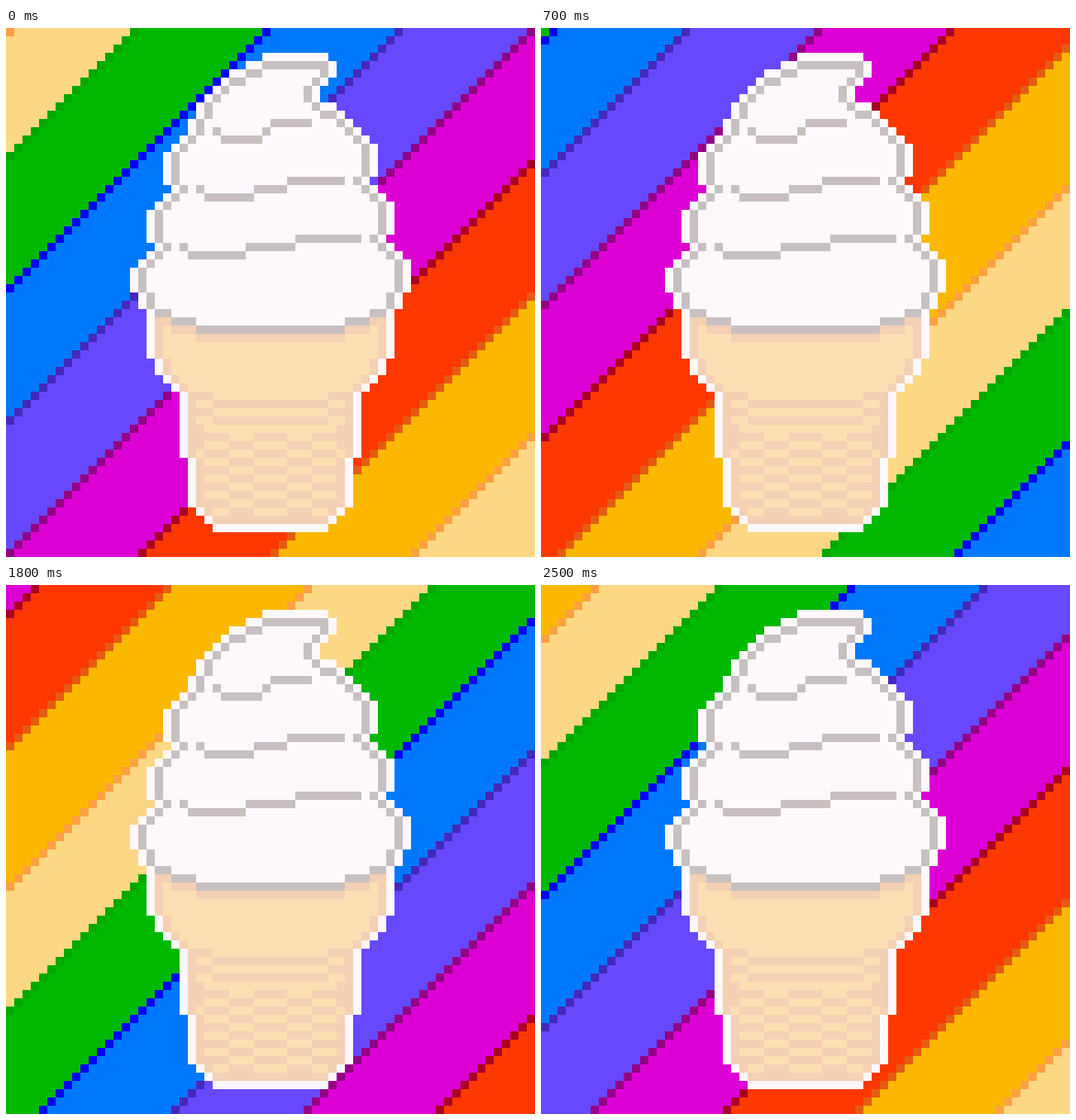
An HTML page with a canvas for the animation above (2600 ms loop, 640x640 px).

```html
<!DOCTYPE html>
<html lang="en">
<head>
<meta charset="utf-8">
<title>Soft serve</title>
<style>
html, body { margin: 0; width: 100%; height: 100%; overflow: hidden; }
canvas { display: block; width: 640px; height: 640px; image-rendering: pixelated; }
</style>
</head>
<body>
<canvas id="stage" width="64" height="64"></canvas>
<script>
const SIZE = 64, BAND = 16, STEPS = 26, STEP_MS = 100;
const ctx = document.getElementById('stage').getContext('2d');
const WHITE = '#fcf8fc', GRAY = '#c8c0c0', WAFER = '#fcdfb2', SHADE = '#f4d0b4';

// edge and body colour of each diagonal band
const bands = [
  ['#fca044', '#fcd884'], ['#00a800', '#00b800'], ['#0000fc', '#0078fc'],
  ['#4428bc', '#6848fc'], ['#940084', '#dc00d4'], ['#a80020', '#fc3800'],
  ['#e45c10', '#fcb800']
];
const PERIOD = BAND * bands.length;

// cells along straight and diagonal segments between key points
function trace(...points) {
  let [[x, y]] = points;
  const cells = [[x, y]];
  for (const [px, py] of points) {
    while (x !== px || y !== py) {
      x += Math.sign(px - x);
      y += Math.sign(py - y);
      cells.push([x, y]);
    }
  }
  return cells;
}
const mirror = (cells, drop = 0) => cells.map(([x, y]) => [SIZE - 1 - x, y + drop]);

function rowSpans(cells) {
  const rows = {};
  for (const [x, y] of cells) {
    const r = rows[y] || (rows[y] = [x, x]);
    r[0] = Math.min(r[0], x);
    r[1] = Math.max(r[1], x);
  }
  return Object.entries(rows).map(([y, [a, b]]) => [a, +y, b - a + 1]);
}

const tip = trace([20, 15], [23, 12], [23, 11], [24, 10], [24, 9], [27, 6], [28, 6], [29, 5],
  [30, 5], [31, 4], [38, 4], [38, 5], [36, 7], [36, 8], [38, 10], [39, 10], [43, 14]);
const lobes = trace([43, 14], [43, 17], [42, 18], [45, 21], [45, 24], [44, 25], [47, 28], [47, 30]);
const base = trace([47, 31], [46, 32], [46, 33], [45, 34], [44, 34], [43, 35], [41, 35], [40, 36], [32, 36]);
const side = trace([45, 35], [45, 39], [44, 40], [44, 41], [41, 44], [41, 51], [40, 52], [40, 57], [38, 59], [32, 59]);

// the left lobes hang one cell lower than the right ones
const cream = [...tip, ...lobes, ...mirror(lobes, 1), ...base, ...mirror(base)];
const cone = [...side, ...mirror(side)];
const shadow = cream.filter(c => c[1] >= 34).map(([x, y]) => [x, y + 1]);
const creamRows = rowSpans(cream), coneRows = rowSpans(cone);

function rect(color, x, y, w = 1, h = 1) {
  ctx.fillStyle = color;
  ctx.fillRect(x, y, w, h);
}
const dots = (cells, color) => cells.forEach(([x, y]) => rect(color, x, y));
const fill = (rows, color) => rows.forEach(([x, y, w]) => rect(color, x, y, w));

function drawBands(shift) {
  for (let d = 0; d < 2 * SIZE - 1; d++) {
    const p = (d + shift) % PERIOD;
    const i = Math.min(bands.length - 1, Math.floor((p + 1) / BAND));
    const [edge, body] = bands[i];
    const color = p === Math.max(0, i * BAND - 1) ? edge : body;
    for (let x = 0; x <= d; x++) rect(color, x, d - x);
  }
}

function drawWaffle() {
  for (let y = 44; y <= 50; y += 2) {
    const w = y < 48 ? 2 : 1;
    rect(SHADE, 23, y, w);
    rect(SHADE, 41 - w, y, w);
  }
  rect(SHADE, 25, 45, 14);
  rect(SHADE, 25, 47, 14);
  for (let y = 49; y < 59; y++) {
    const left = Math.min(24, y - 26);
    for (let x = left; x < SIZE - left; x++) {
      const wide = (x - 23) % 7 < 4;
      if (wide === (y % 2 === 1)) rect(SHADE, x, y);
    }
  }
}

// each fold is a dot, then three runs that climb one cell at a time
function drawFolds() {
  [[5, 1, 5], [6, 4, 7], [7, 6, 8]].forEach((runs, i) => {
    let x = 25 - 2 * i, y = 12 + 7 * i;
    rect(GRAY, x++, y++);
    for (const w of runs) {
      rect(GRAY, x, y--, w);
      x += w;
    }
  });
}

function drawIceCream() {
  for (const [x, y, w] of [...creamRows, ...coneRows]) {
    rect(WHITE, x - 1, y, w + 2);
    rect(WHITE, x, y - 1, w, 3);
  }
  fill(coneRows, WAFER);
  dots(cone, SHADE);
  drawWaffle();
  dots(shadow, SHADE);
  fill(creamRows, WHITE);
  dots(cream, GRAY);
  drawFolds();
}

const begin = performance.now();
let shown = -1;
function frame() {
  const step = Math.floor((performance.now() - begin) / STEP_MS) % STEPS;
  if (step !== shown) {
    shown = step;
    drawBands(2 * Math.floor(step * PERIOD / 2 / STEPS));
    drawIceCream();
  }
  requestAnimationFrame(frame);
}
frame();
</script>
</body>
</html>
```
